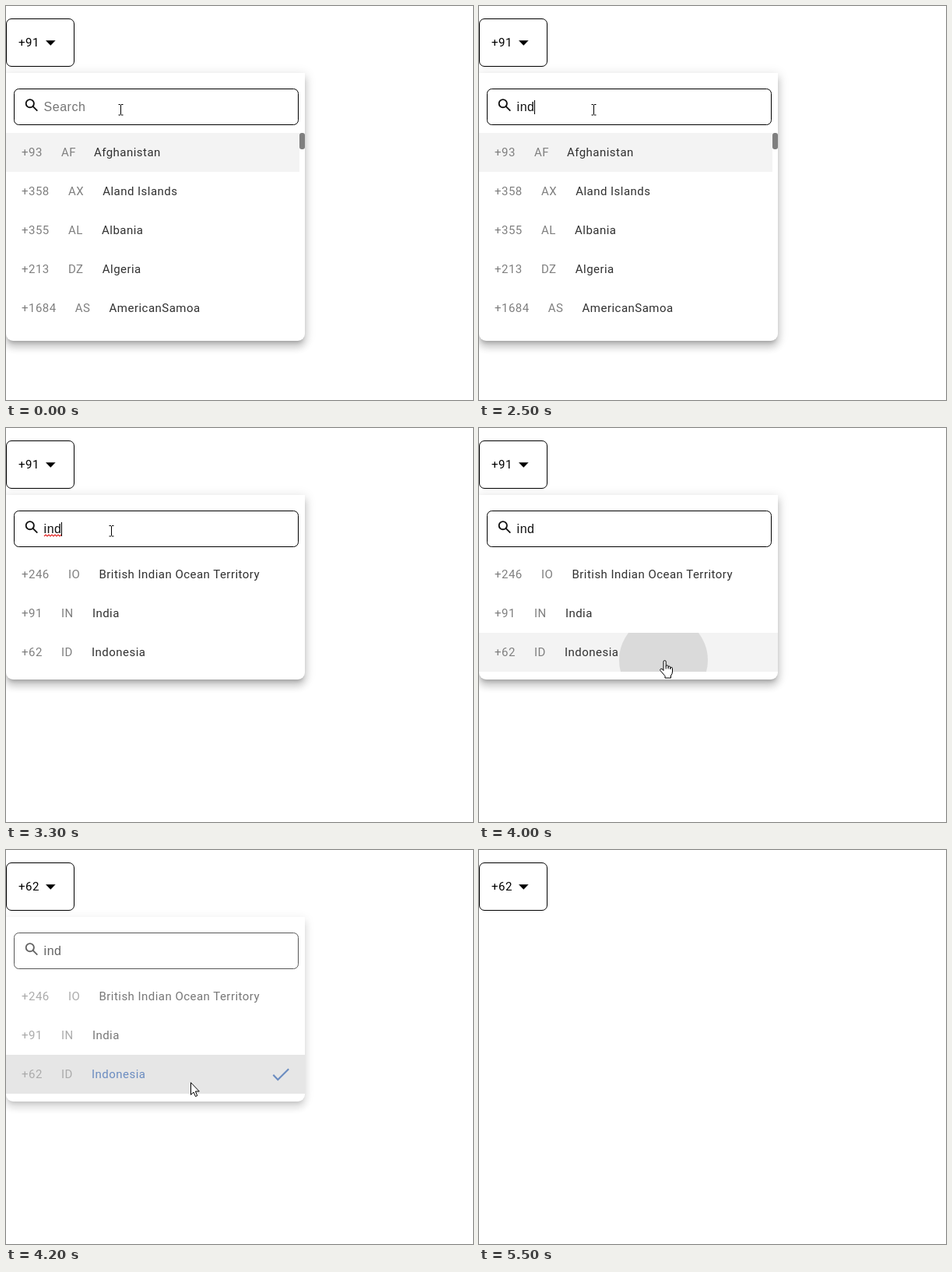
These frames come from a looping animation (600 by 506 pixels, 7 s). An HTML page:

```html
<!DOCTYPE html>
<html lang="en">
<head>
<meta charset="utf-8">
<title>Country code picker</title>
<style>
  html, body { margin: 0; width: 100%; height: 100%; overflow: hidden; background: #fff; }
  svg { position: absolute; left: 0; top: 0; width: 600px; height: 506px; overflow: visible; }
  text { font: 15px Roboto, sans-serif; letter-spacing: .469px; white-space: pre; }
  .code { fill: #7f7f7f; }
  .name { fill: #303030; }
  .chosen { fill: #1c4f9f; }
  .field { font: 16px "Liberation Sans", Arial, sans-serif; letter-spacing: .5px; }
  #panel { position: absolute; left: 0; top: 0; width: 600px; height: 506px; }
  #card {
    position: absolute; left: 0; top: 86px; width: 384px; background: #fff;
    border-radius: 0 0 9px 9px;
    box-shadow: 0 5px 5px -3px rgba(0,0,0,.2), 0 8px 10px 1px rgba(0,0,0,.14), 0 3px 14px 2px rgba(0,0,0,.12);
  }
</style>
</head>
<body>
<div id="panel">
  <div id="card"></div>
  <svg viewBox="0 0 600 506">
    <defs><clipPath id="rowClip"><rect y="263" width="384" height="50"/></clipPath></defs>
    <rect x="10.5" y="106.5" width="365" height="46" rx="6" fill="#fff" stroke="#000"/>
    <g fill="none" stroke="#111" stroke-width="1.9">
      <circle cx="30.8" cy="125.2" r="5.1"/>
      <path d="M34.5 128.9L40.3 134.7"/>
    </g>
    <text id="field" class="field" x="48.6" y="135"></text>
    <path id="squiggle" fill="none" stroke="#e02020" stroke-width="1.1"/>
    <path id="caret" d="M0 121V139" stroke="#000"/>
    <rect id="hover" height="50" fill="#f3f3f3"/>
    <circle id="ripple" cx="237" cy="298" fill="#000" fill-opacity=".1" clip-path="url(#rowClip)"/>
    <g id="all"></g>
    <g id="found"></g>
    <rect id="thumb" x="377" y="163" width="7" height="21" rx="3" fill="#7f7f7f"/>
    <path id="check" d="M343.3 288.7L349.3 294.9L363.2 281.2" fill="none" stroke="#1c4f9f" stroke-width="2.1"/>
  </svg>
</div>
<svg viewBox="0 0 600 506">
  <rect x=".5" y="16.5" width="87" height="61" rx="6.5" fill="none" stroke="#000"/>
  <text id="dial" x="16" y="52"></text>
  <path d="M51 44.3H63.6L57.3 50.8Z"/>
  <g id="beam" fill="none" stroke="#000">
    <path d="M-3 -6.5H-.5M.5 -6.5H3M0 -6V6.5M-3 7H-.5M.5 7H3"/>
  </g>
  <path id="hand" fill="#fff" stroke="#000" stroke-linejoin="round"
    d="M0 13.5V2.2a1.6 1.6 0 0 1 3.2 0V8.2a1.4 1.4 0 0 1 2.9 0V9.4a1.4 1.4 0 0 1 2.8 0V10.6a1.3 1.3 0 0 1 2.6 0V15q0 3 -2 5V23H2V20.5L-4 13.5q-.8 -1.5 .6 -2.2q1.4 -.4 2.4 .8ZM3.2 8V11.5M6.1 9V11.5M8.9 10V12"/>
  <path id="arrow" fill="#fff" stroke="#000" d="M.5 .7V16.3L4 13L6.5 18.5L8.8 17.5L6.4 12H11.3Z"/>
</svg>
<script>
const LOOP = 7000;
const $ = id => document.getElementById(id);
const show = (id, on) => { $(id).style.display = on ? "" : "none"; };
const within = (t, spans) => spans.some(([a, b]) => t >= a && t < b);

const countries = [
  ["+93", "AF", "Afghanistan"],
  ["+358", "AX", "Aland Islands"],
  ["+355", "AL", "Albania"],
  ["+213", "DZ", "Algeria"],
  ["+1684", "AS", "AmericanSamoa"]
];
const matches = [
  ["+246", "IO", "British Indian Ocean Territory"],
  ["+91", "IN", "India"],
  ["+62", "ID", "Indonesia"]
];

const caretOn = [[100, 800], [1300, 2100], [2500, 2900], [3300, 3700]];

// time, shape, x, y
const pointer = [
  [0, "beam", 147.5, 133],
  [3000, "beam", 144.5, 133],
  [3100, "beam", 139.5, 132],
  [3200, "beam", 135.5, 132],
  [3400, "hand", 150, 182],
  [3500, "hand", 205, 260],
  [3600, "hand", 237, 298],
  [4200, "arrow", 237, 298],
  [4900, "arrow", 232, 293],
  [5100, "arrow", 237, 286],
  [5400, "arrow", 424, 175],
  [5500, "", 0, 0]
];

function fillList(id, rows) {
  $(id).innerHTML = rows.map(([code, iso, name], i) =>
    `<text x="20" y="${193 + 50 * i}"><tspan class="code">${code}</tspan>` +
    `<tspan class="code" dx="24.19">${iso}</tspan>` +
    `<tspan class="name" dx="24.19">${name}</tspan></text>`).join("");
}

function drawField(t) {
  const typed = "ind".slice(0, t < 1600 ? 0 : Math.floor((t - 1500) / 100));
  const field = $("field");
  field.textContent = typed || "Search";
  field.setAttribute("fill", typed ? "#111" : "#757575");
  const end = 48.6 + (typed ? field.getComputedTextLength() : 0);
  $("caret").setAttribute("transform", `translate(${Math.round(end) + .5})`);
  show("caret", within(t, caretOn));
  show("squiggle", t >= 2600 && t < 4000);
}

function drawPointer(t) {
  const [, shape, x, y] = pointer.filter(p => p[0] <= t).pop();
  for (const id of ["beam", "hand", "arrow"]) show(id, id === shape);
  if (shape) $(shape).setAttribute("transform", `translate(${x} ${y})`);
}

function draw(ms) {
  const t = Math.floor(ms / 100) * 100;
  const filtered = t >= 2600;
  const pressed = t >= 4000;
  const picked = t >= 4100;

  show("panel", t < 4300);
  $("panel").style.opacity = t >= 4200 ? .65 : 1;
  $("card").style.height = (filtered ? 237 : 344) + "px";
  show("all", !filtered);
  show("thumb", !filtered);
  show("found", filtered);

  show("hover", !filtered || pressed);
  $("hover").setAttribute("y", filtered ? 263 : 163);
  $("hover").setAttribute("width", filtered ? 384 : 377);
  show("ripple", pressed);
  $("ripple").setAttribute("r", t < 4100 ? 57 : t < 4200 ? 150 : 260);
  show("check", picked);
  $("found").lastChild.lastChild.setAttribute("class", picked ? "chosen" : "name");
  $("dial").textContent = picked ? "+62" : "+91";

  drawField(t);
  drawPointer(t);
}

fillList("all", countries);
fillList("found", matches);
$("squiggle").setAttribute("d", "M49 139" +
  Array.from({ length: 11 }, (_, i) => `L${51 + 2 * i} ${i % 2 ? 139 : 137}`).join(""));

const start = performance.now();
function tick() {
  draw((performance.now() - start) % LOOP);
  requestAnimationFrame(tick);
}
tick();
</script>
</body>
</html>
```
